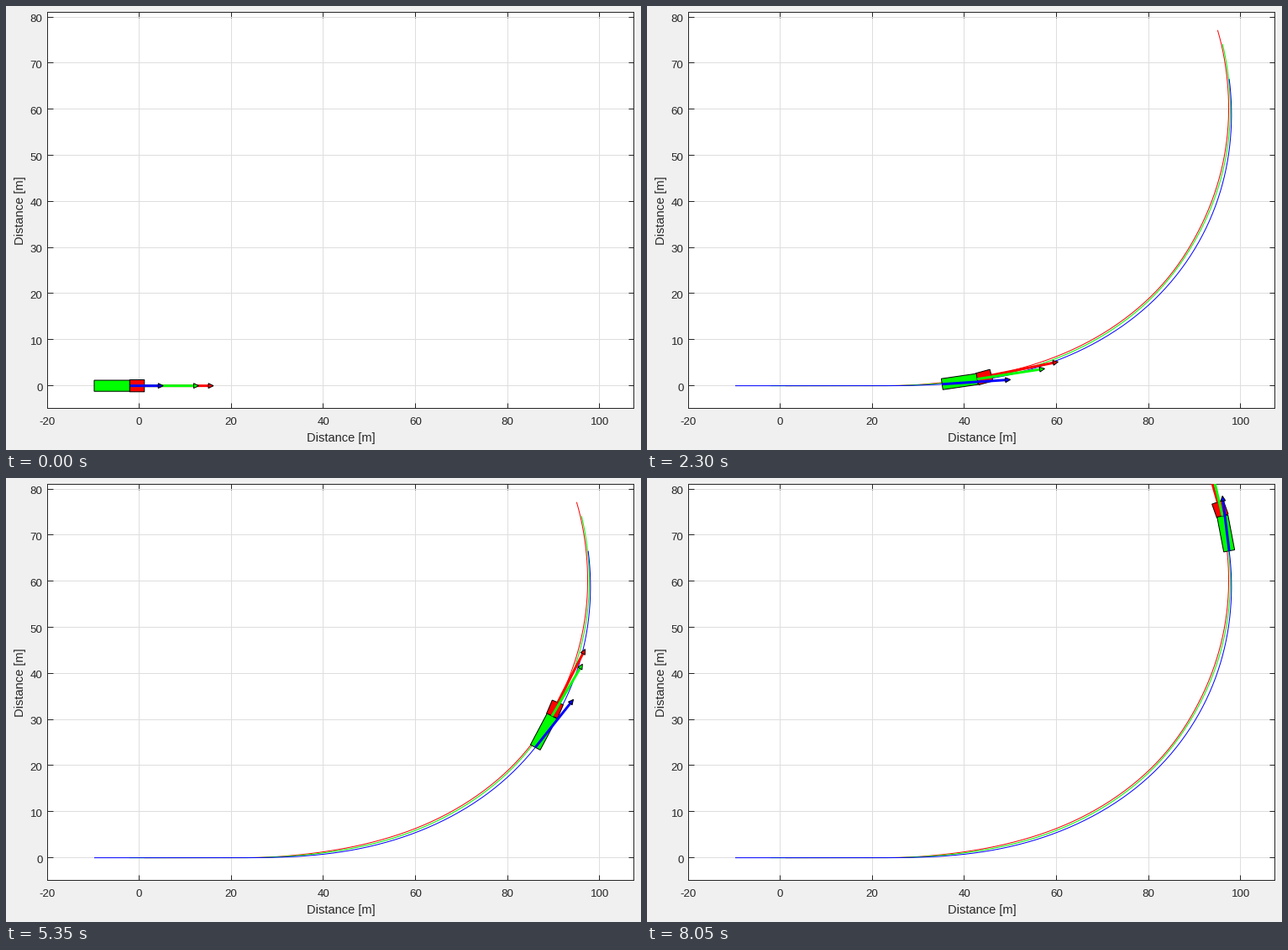
A matplotlib script for the animation above (8.1 s loop, 756 by 528 pixels).

```python
import numpy as np
import matplotlib.pyplot as plt
from matplotlib.animation import FuncAnimation
from matplotlib.patches import Polygon
from matplotlib.transforms import Affine2D

W, H, DPI = 756, 528, 72          # at 72 dpi one point is one pixel
FRAMES, INTERVAL, FPS = 162, 50, 15
XLIM, YLIM = (-20, 107.4), (-4.92, 81.04)
LEFT, RIGHT, TOP, BOTTOM = 49.1, 747.4, 7.4, 478.6
PX = (XLIM[1] - XLIM[0]) / (RIGHT - LEFT)   # metres per pixel
SNAP = 0.5                        # snapped lines land half a pixel late
INK = "#262626"
RED, GREEN, BLUE = "#ff0000", "#00ff00", "#0000ff"
TRAILER_LEN, TRACTOR_LEN = 7.7, 3.2

# Motion: speed, course of the trailer's rear, and both headings
STEPS = np.arange(1, FRAMES)
KNOTS = np.array([0, 18, 24, 29, 36, 44, 53, 63, 86, 107, 142, 161])
COURSE = [0, 0, 0, 0, 0.5, 2.9, 7.5, 14.2, 32.2, 51.5, 82.6, 97.4]
TRAILER = [0, 0, 0, 0.3, 2.6, 7, 13, 20.4, 40.7, 62, 88.4, 100.8]
TRACTOR = [0, 0, 0.4, 2.5, 7.6, 13.6, 20.8, 28.7, 48, 67, 96.5, 109.5]


def spline(values):
    """Cubic Hermite curve through the knots, sampled at every step."""
    v = np.array(values, float)
    m = np.gradient(v, KNOTS)
    flat = np.diff(v) == 0
    m[:-1][flat] = m[1:][flat] = 0
    k = np.clip(np.searchsorted(KNOTS, STEPS, "right") - 1, 0, len(KNOTS) - 2)
    h = KNOTS[k + 1] - KNOTS[k]
    u = (STEPS - KNOTS[k]) / h
    return ((1 + 2 * u) * (1 - u) ** 2 * v[k] + u * (1 - u) ** 2 * h * m[k]
            + u * u * (3 - 2 * u) * v[k + 1] + u * u * (u - 1) * h * m[k + 1])


def unit(degrees):
    a = np.radians(degrees)
    return np.stack([np.cos(a), np.sin(a)], axis=-1)


speed = np.interp(STEPS, [1, 34, 63, 86, 107, 142, 161],
                  [1, 1, 0.98, 0.93, 0.885, 0.825, 0.80])
vel = speed[:, None] * unit(spline(COURSE))
moves = np.vstack([[0, 0], (vel[1:] + vel[:-1]) / 2])
rear = np.array([-9.8, 0]) + np.cumsum(moves, axis=0)
hitch = rear + TRAILER_LEN * unit(spline(TRAILER))
front = hitch + TRACTOR_LEN * unit(spline(TRACTOR))

fig = plt.figure(figsize=(W / DPI, H / DPI), dpi=DPI, facecolor="#f0f0f0")
ax = fig.add_axes([(LEFT - SNAP) / W, 1 - (BOTTOM - SNAP) / H,
                   (RIGHT - LEFT) / W, (BOTTOM - TOP) / H])
ax.set(xlim=XLIM, ylim=YLIM, xticks=range(-20, 101, 20), yticks=range(0, 81, 10))
ax.set_axisbelow(True)
ax.grid(color="#dedede", lw=1)
ax.tick_params(direction="in", length=6.5, width=1, color=INK, top=True, right=True,
               labelbottom=False, labelleft=False)
for spine in ax.spines.values():
    spine.set(color=INK, linewidth=1)
DATA = ax.transData + Affine2D().translate(SNAP, -SNAP)


def label(x, y, text, size=13.33, **kw):
    fig.text(x / W, 1 - y / H, text, fontsize=size, color=INK,
             family="Liberation Sans", va="baseline", **kw)


for x in range(-20, 101, 20):
    label(LEFT + (x - XLIM[0]) / PX - 0.2, 498, str(x), ha="center")
for y in range(0, 81, 10):
    label(43.5, BOTTOM - (y - YLIM[0]) / PX + 6, str(y), ha="right")
label(398.5, 518, "Distance [m]", 14.67, ha="center")
label(21.5, 243, "Distance [m]", 14.67, ha="center", rotation=90, rotation_mode="anchor")


def line(color, lw, z, points=((), ())):
    return ax.plot(*points, color=color, lw=lw, zorder=z, transform=DATA,
                   solid_capstyle="butt", snap=False)[0]


def patch(color, z):
    p = Polygon(np.zeros((3, 2)), fc=color, ec="black", lw=1, joinstyle="miter",
                zorder=z, transform=DATA, snap=False)
    return ax.add_patch(p)


class Arrow:
    HEAD, HALF = 6 * PX, 2.9 * PX

    def __init__(self, path, color, z):
        self.path, self.vel = path, np.gradient(path, axis=0) * FPS
        self.shaft = line(color, 3, z)
        self.head = patch(color, z + 0.1)

    def update(self, k):
        start, tip = self.path[k], self.path[k] + self.vel[k]
        d = self.vel[k] / np.hypot(*self.vel[k])
        side = self.HALF * np.array([-d[1], d[0]])
        base = tip - self.HEAD * d
        self.shaft.set_data(*zip(start, base))
        self.head.set_xy([tip, base + side, base - side])


def set_box(box, a, b, half):
    d = (b - a) / np.hypot(*(b - a))
    side = half * np.array([-d[1], d[0]])
    box.set_xy([a + side, b + side, b - side, a - side])


trails = [line(c, 1, 2.5, path.T)
          for path, c in ((front, RED), (hitch, GREEN), (rear, BLUE))]
tractor, trailer = patch(RED, 3), patch(GREEN, 4)
arrows = [Arrow(front, RED, 5), Arrow(hitch, GREEN, 6), Arrow(rear, BLUE, 7)]


def draw(i):
    k = max(i - 1, 0)
    for trail in trails:
        trail.set_visible(i > 0)
    set_box(tractor, hitch[k], front[k], 1.3)
    set_box(trailer, rear[k], hitch[k], 1.2)
    trailer.set_zorder(4 if i else 9)   # the trailer covers the arrows at rest
    for arrow in arrows:
        arrow.update(k)
    return []


anim = FuncAnimation(fig, draw, frames=FRAMES, interval=INTERVAL, repeat=True)
plt.show()
```
